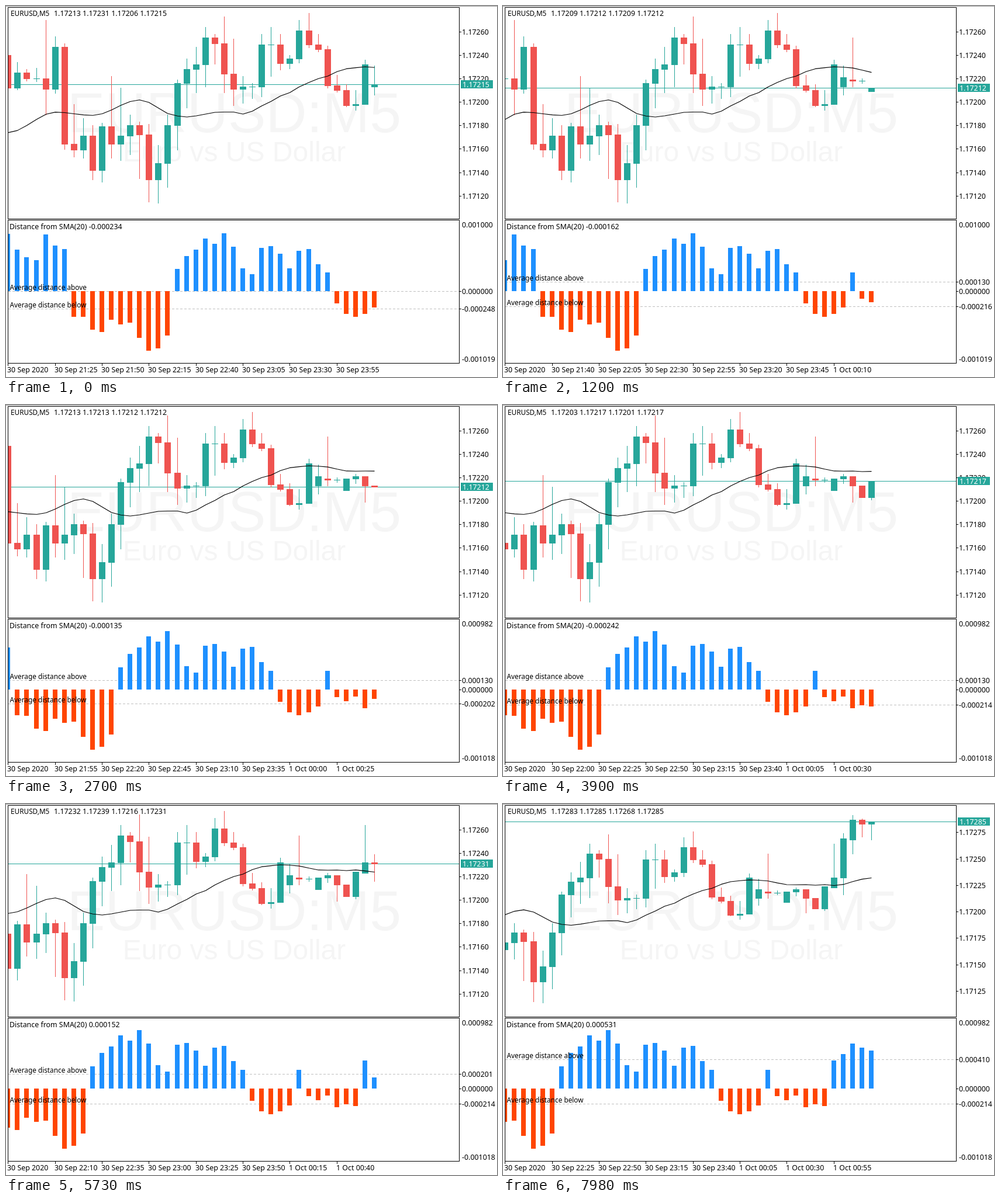
Recreate the animation shown at these times as an HTML page with a canvas. Size 840 by 635 pixels, loop 8 s.

```html
<!DOCTYPE html>
<html lang="en">
<head>
<meta charset="utf-8">
<title>Distance from SMA</title>
<style>
html, body { margin: 0; width: 100%; height: 100%; overflow: hidden; background: #fff; }
canvas { display: block; }
</style>
</head>
<body>
<canvas id="chart" width="840" height="635"></canvas>
<script>
const ctx = document.getElementById('chart').getContext('2d');
const LOOP = 8000, TICK = 30, PERIOD = 20, VISIBLE = 40;
const UP = '#26a69a', DOWN = '#ef5350', ABOVE = '#1e90ff', BELOW = '#ff4500';
const sans = size => size + 'px "Noto Sans", "Open Sans", sans-serif';
const FONT = sans(12.4), SMALL = sans(11.8);
const LEFT = 3, RIGHT = 775, TOP = 2, PRICE_END = 364, HIST_TOP = 366, HIST_END = 611;

// Prices are in points above 1.17000.
const closes = [212, 225, 220, 220, 211, 247, 164, 159, 171, 142, 179, 164, 171, 180, 172, 134, 148, 180,
  216, 228, 232, 255, 250, 224, 211, 213, 213, 249, 249, 233, 237, 261, 249, 245, 214, 210];
const TEST_START = closes.length;
const spikesUp = { 4: 50, 7: 34, 11: 43, 12: 41, 23: 23, 24: 30 };
const spikesDown = { 4: 22, 14: 37, 28: 27 };

const history = closes.map((c, i) => {
  const o = closes[i - 1] ?? 240;
  const up = spikesUp[i] ?? 9 + 6 * Math.cos(i * Math.PI / 2);
  const down = spikesDown[i] ?? 1 + 20 * Math.exp(-(((i - 18) / 9) ** 2));
  return { o, h: Math.max(o, c) + up, l: Math.min(o, c) - down, c };
});

// Tested bars: start time, then the price path followed until the next bar starts.
const legs = [
  [-1000, 210, 215, 196, 197],
  [-800, 197, 210, 193, 198],
  [-600, 198, 236, 232],
  [-400, 213, 231, 206, 221],
  [60, 219, 255, 213, 218],
  [690, 218, 220, 216, 218],
  [960, 209, 212, 211, 219],
  [1680, 219, 215, 223, 221],
  [2010, 221, 199, 213],
  [2520, 213, 212, 208, 203],
  [3400, 203, 201, 217, 212, 219, 217, 224],
  [4900, 223, 264, 232],
  [5310, 232, 239, 216, 231, 251, 274, 269],
  [6150, 268, 272, 261, 262, 255, 291, 287],
  [7290, 287, 288, 271, 283],
  [7640, 283, 268, 285],
  [7970]
];

function formBar(k, t) {
  const [start, ...path] = legs[k], end = legs[k + 1][0];
  const pos = Math.min(1, (t - start) / (end - start)) * (path.length - 1);
  const i = Math.floor(pos), next = path[i + 1] ?? path[i];
  const c = Math.round(path[i] + (next - path[i]) * (pos - i));
  const seen = [...path.slice(0, i + 1), c];
  return { o: path[0], h: Math.max(...seen), l: Math.min(...seen), c };
}

// The average before a full period of closes is known, eased between turning points.
const turns = [[0, 173.8], [5, 191.3], [9, 188.5], [14, 201.7], [18, 188]];
function earlySma(i) {
  const k = turns.findIndex(([at], n) => n > 0 && i <= at);
  const [x0, y0] = turns[k - 1], [x1, y1] = turns[k];
  const u = (i - x0) / (x1 - x0);
  return y0 + (y1 - y0) * u * u * (3 - 2 * u);
}

function buildBars(t) {
  const bars = history.map(b => ({ ...b }));
  for (let k = 0; k < legs.length - 1 && legs[k][0] <= t; k++) bars.push(formBar(k, t));
  bars.forEach((b, i) => {
    const span = bars.slice(i - PERIOD + 1, i + 1);
    b.sma = i < PERIOD - 1 ? earlySma(i) : span.reduce((s, x) => s + x.c, 0) / PERIOD;
    const up = b.h - b.sma, down = b.l - b.sma;
    b.dist = up > -down ? up : down;
  });
  return bars;
}

function average(bars, sign) {
  const list = bars.slice(TEST_START).map(b => b.dist).filter(d => d * sign > 0);
  return list.reduce((s, d) => s + d, 0) / (list.length + 1);
}

const price = p => (1.17 + p / 1e5).toFixed(5);
function distance(d) {
  const n = Math.round(Math.abs(d) * 10 + 1e-6);
  return (d < 0 && n ? '-' : '') + (n / 1e6).toFixed(6);
}
const barX = i => Math.round(LEFT + 0.3 + i * 16.07);

function rect(x, y, w, h, color) {
  ctx.fillStyle = color;
  ctx.fillRect(x, y, w, h);
}
function text(str, x, y, font = FONT, color = '#000', align = 'left') {
  ctx.font = font;
  ctx.fillStyle = color;
  ctx.textAlign = align;
  ctx.fillText(str, x, y);
}
function axisLabel(str, y) {
  rect(RIGHT, Math.round(y), 4, 1, '#000');
  text(str, 780, Math.round(y) + 5);
}
function clipped(y, h, draw) {
  ctx.save();
  ctx.beginPath();
  ctx.rect(LEFT + 1, y, RIGHT - LEFT - 1, h);
  ctx.clip();
  draw();
  ctx.restore();
}
function frame(y, end) {
  ctx.strokeStyle = '#000';
  ctx.lineWidth = 1;
  ctx.strokeRect(LEFT + 0.5, y + 0.5, RIGHT - LEFT, end - y);
}
function watermark(str, y, size) {
  text(str, 390.5, y, size + 'px "Liberation Sans", Arial, sans-serif', '#f5f5f5', 'center');
}

function drawPrices(shown, last) {
  const tall = Math.max(...shown.map(b => b.h)) > 280;
  const scale = tall ? 1.811 : 2.007, base = tall ? 184.2 : 164.2;
  const y = p => base - (p - 200) * scale;
  const lineY = Math.round(y(last.c));

  clipped(TOP + 1, PRICE_END - TOP - 1, () => {
    watermark('EURUSD:M5', 216, 97);
    watermark('Euro vs US Dollar', 266, 48);
    rect(LEFT, lineY, RIGHT - LEFT, 1, UP);
    shown.forEach((b, i) => {
      const x = barX(i), color = b.c >= b.o ? UP : DOWN;
      const top = Math.round(y(Math.max(b.o, b.c))), bottom = Math.round(y(Math.min(b.o, b.c)));
      const high = Math.round(y(b.h)), low = Math.round(y(b.l));
      rect(x, high, 1, low - high + 1, color);
      rect(x - 5, top, 11, bottom - top + 1, color);
    });
    ctx.beginPath();
    shown.forEach((b, i) => ctx.lineTo(barX(i) + 0.5, y(b.sma)));
    ctx.strokeStyle = '#000';
    ctx.lineWidth = 1.1;
    ctx.lineJoin = 'round';
    ctx.stroke();
  });

  text('EURUSD,M5', 8, 17, SMALL);
  text([last.o, last.h, last.l, last.c].map(price).join(' '), 82, 17);
  const step = tall ? 25 : 20;
  for (let p = tall ? 125 : 120; p <= (tall ? 275 : 260); p += step) axisLabel(price(p), y(p));
  rect(778, lineY - 7, 55, 14, UP);
  text(price(last.c), 781, lineY + 5, FONT, '#fff');
}

function drawDistances(shown, bars, last) {
  const early = bars.length < 45;
  const max = early ? 100 : 98.2, min = early ? -101.9 : -101.8;
  const y = d => 367 + (max - d) * 244 / (max - min);
  const zero = Math.round(y(0));
  const levels = [['above', average(bars, 1)], ['below', average(bars, -1)]];

  clipped(HIST_TOP + 1, HIST_END - HIST_TOP - 1, () => {
    ctx.strokeStyle = '#c0c0c0';
    ctx.lineWidth = 1;
    ctx.setLineDash([4, 3]);
    for (const [, d] of levels) {
      const ly = Math.round(y(d)) + 0.5;
      ctx.beginPath();
      ctx.moveTo(LEFT + 1, ly);
      ctx.lineTo(RIGHT, ly);
      ctx.stroke();
    }
    shown.forEach((b, i) => {
      const end = Math.round(y(b.dist));
      rect(barX(i) - 4, Math.min(zero, end), 8, Math.abs(end - zero), b.dist > 0 ? ABOVE : BELOW);
    });
  });

  text('Distance from SMA(20) ' + distance(last.dist), 6, 382);
  axisLabel(distance(0), zero);
  for (const [name, d] of levels) {
    const ly = Math.round(y(d));
    text('Average distance ' + name, 6.5, ly - 2, SMALL);
    if (d) axisLabel(distance(d), ly);
  }
  text(distance(max), 780, 379);
  text(distance(min), 780, 609);
}

function drawTimes(first) {
  const two = n => String(n).padStart(2, '0');
  for (let i = 0; i < VISIBLE; i += 5) {
    const minutes = 21 * 60 + (first + i) * 5, x = barX(i);
    const day = minutes < 1440 ? '30 Sep ' : '1 Oct ';
    const clock = two(Math.floor(minutes / 60) % 24) + ':' + two(minutes % 60);
    rect(x, HIST_END, 1, 5, '#000');
    text(day + (i ? clock : '2020'), x - 1, 627);
  }
}

function draw(t) {
  const bars = buildBars(Math.floor(t / TICK) * TICK);
  const first = bars.length - VISIBLE, shown = bars.slice(first), last = bars[bars.length - 1];
  rect(0, 0, 840, 635, '#fff');
  rect(0, 0, 840, 1, '#a0a0a0');
  drawPrices(shown, last);
  drawDistances(shown, bars, last);
  drawTimes(first);
  frame(TOP, PRICE_END);
  frame(HIST_TOP, HIST_END);
}

function loop() {
  draw(performance.now() % LOOP);
  requestAnimationFrame(loop);
}
loop();
</script>
</body>
</html>
```
